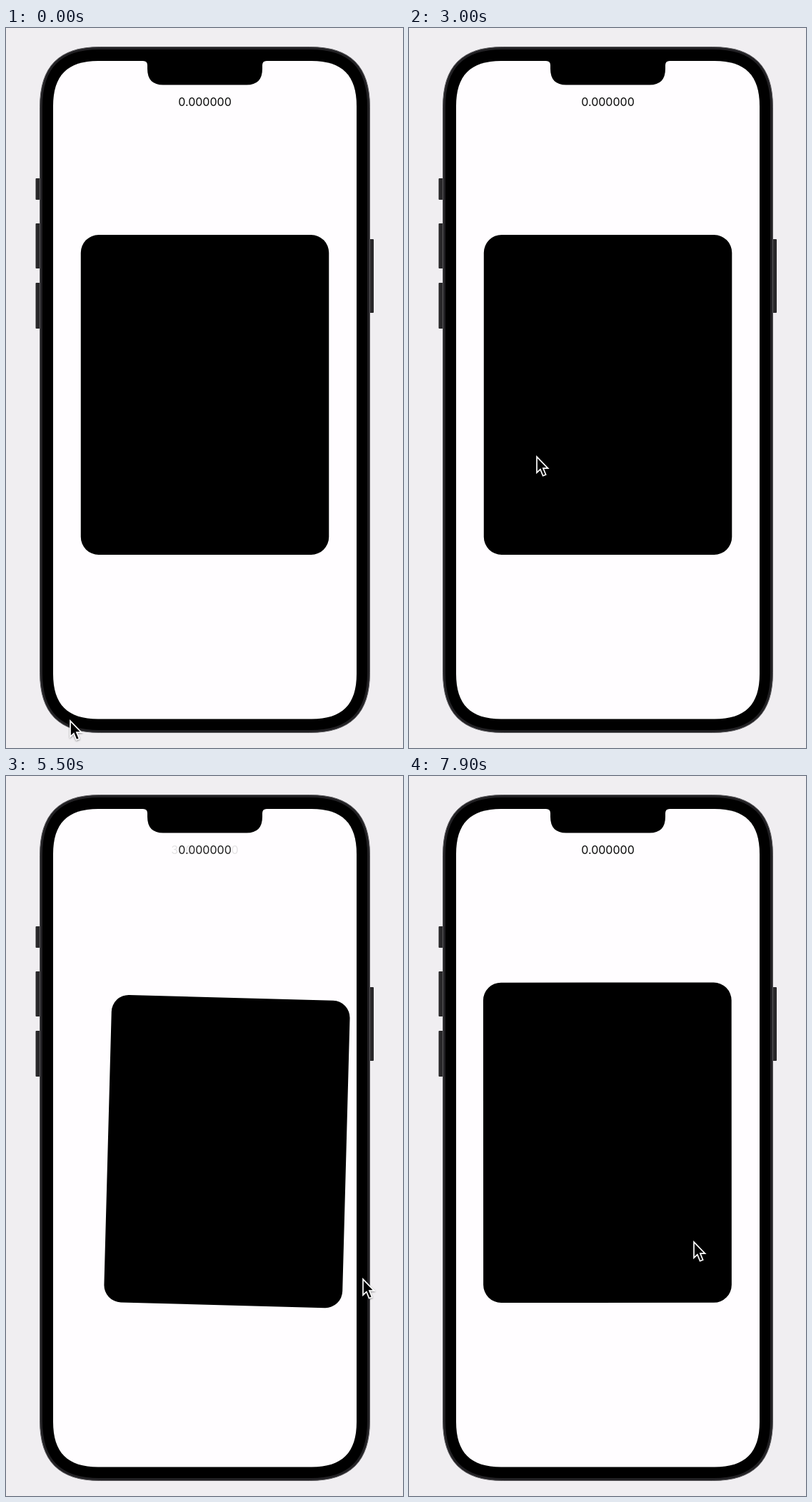
Write an HTML page that moves like this. It is 556x1006 px and loops after 8 s.

```html
<!DOCTYPE html>
<html lang="en">
<head>
<meta charset="utf-8">
<title>Card drag</title>
<style>
  html, body { margin: 0; width: 100%; height: 100%; overflow: hidden; background: #f0eef1; }
  svg { display: block; width: 556px; height: 1006px; }
  text { font: 16px Inter, Roboto, sans-serif; text-anchor: middle; fill: #080808; }
  #cursor { filter: drop-shadow(0 1.5px 1.2px rgba(0, 0, 0, .4)); }
</style>
</head>
<body>
<svg viewBox="0 0 556 1006">
  <defs>
    <clipPath id="screen"><use href="#glass"/></clipPath>
  </defs>
  <g fill="#29282a">
    <rect x="41.500" y="210" width="7" height="30" rx="1"/>
    <rect x="41.500" y="273" width="7" height="63" rx="1"/>
    <rect x="41.500" y="356" width="7" height="64" rx="1"/>
    <rect x="508" y="295" width="7" height="103" rx="1"/>
  </g>
  <path id="frame" fill="#222124" stroke="#5c5b5e"/>
  <path id="bezel"/>
  <path id="glass" fill="#fffdff"/>
  <path d="M192 45V46Q198 46 198 52V57Q198 79.500 220 79.500H337Q359 79.500 359 57V52Q359 46 365 46V45Z"/>
  <g clip-path="url(#screen)">
    <rect id="card" x="-173.750" y="-223.500" width="347.500" height="447" rx="25"/>
  </g>
  <text id="oldLabel" x="278.500" y="109"></text>
  <text id="newLabel" x="278.500" y="109"></text>
  <path id="cursor" stroke="#fff" stroke-width="1.700" d="M0 1.200V23.200L4.900 18.600L8.600 27.700L12.600 26L8.900 17.200H15.600Z"/>
</svg>
<script>
const LOOP = 8000, STEP = 100, LAG = 55, SHRINK = .245;
const $ = id => document.getElementById(id);

// Pointer: time, x, y. The card and the label follow from it.
const pointer = [
  [100, 323, 770], [200, 323, 770], [400, 396, 690], [600, 337.333, 609], [750, 337.333, 609],
  [1500, 220, 661], [2150, 20, 752], [2500, 19, 732], [3000, 179, 598], [3250, 202.667, 593],
  [4600, 310, 664], [5100, 430, 764], [5235, 502.667, 710], [5500, 500, 702], [6000, 278.333, 624],
  [6250, 278.333, 624], [6900, 415, 685], [7200, 556, 740], [7450, 556, 720], [7900, 399, 650]
];
const drags = [[750, 2150], [3250, 5235], [6250, 7200]];

function pointerAt(t) {
  if (t < pointer[0][0]) return [90, 967];
  const i = pointer.findLastIndex(key => key[0] <= t);
  const [t0, x0, y0] = pointer[i], [t1, x1, y1] = pointer[i + 1] || [LOOP, x0, y0];
  const k = (t - t0) / (t1 - t0);
  return [x0 + (x1 - x0) * k, y0 + (y1 - y0) * k];
}

// What is left of a spring with response 0.55 s and damping 0.825.
function spring(ms) {
  if (ms <= 0) return 1;
  const s = ms / 1000, w = 2 * Math.PI / .55, z = .825, root = Math.sqrt(1 - z * z);
  const a = w * root * s;
  return Math.exp(-z * w * s) * (Math.cos(a) + z / root * Math.sin(a));
}

// Thirds of a point, cut to single precision.
function format(v) {
  const third = Math.round(v * 3) / 3;
  return (Math.trunc(third * 65536) / 65536 || 0).toFixed(6);
}

// Box whose corners bend gently into the sides.
function softBox(left, top, right, bottom, size) {
  const c = size * .32;
  return `M${left} ${top + size}C${left} ${top + c} ${left + c} ${top} ${left + size} ${top}` +
    `H${right - size}C${right - c} ${top} ${right} ${top + c} ${right} ${top + size}` +
    `V${bottom - size}C${right} ${bottom - c} ${right - c} ${bottom} ${right - size} ${bottom}` +
    `H${left + size}C${left + c} ${bottom} ${left} ${bottom - c} ${left} ${bottom - size}Z`;
}

function setLabel(id, text, alpha) {
  $(id).textContent = text;
  $(id).style.opacity = alpha;
}

function setLabels(oldText, oldAlpha, newText, newAlpha) {
  const same = oldText === newText;
  setLabel('oldLabel', oldText, same ? 0 : oldAlpha);
  setLabel('newLabel', newText, same ? 1 : newAlpha);
}

function place(id, x, y, rest = '') {
  $(id).setAttribute('transform', `translate(${x} ${y}) ${rest}`);
}

function draw(t) {
  place('cursor', ...pointerAt(t));

  const [start, end] = drags.findLast(d => d[0] <= t) || [LOOP, LOOP];
  const press = pointerAt(start);
  const moved = at => pointerAt(Math.max(start, Math.min(at, end))).map((v, i) => v - press[i]);
  const label = at => format(moved(at)[0]);

  const left = spring(t - end);
  const [dx, dy] = moved(t - LAG).map(v => v * left);
  const scale = 1 - SHRINK * (1 - spring(Math.min(t, end) - start)) * spring(t - end - LAG / 2);
  place('card', 278.5 + dx * scale, 512.5 + dy * scale, `rotate(${dx / 20.8}) scale(${scale})`);

  const fade = Math.max(0, left);
  if (t < end) setLabels(label(t - STEP), .48, label(t), .6);
  else setLabels(label(end), fade, format(0), 1 - fade);
}

$('frame').setAttribute('d', softBox(47.5, 26.5, 509.5, 984.5, 84));
$('bezel').setAttribute('d', softBox(51, 30, 506, 981, 80));
$('glass').setAttribute('d', softBox(66, 46, 491, 965.5, 63));

const begin = performance.now();
function tick() {
  const t = (performance.now() - begin) % LOOP;
  draw(Math.floor(t / STEP) * STEP);
  requestAnimationFrame(tick);
}
tick();
</script>
</body>
</html>
```
